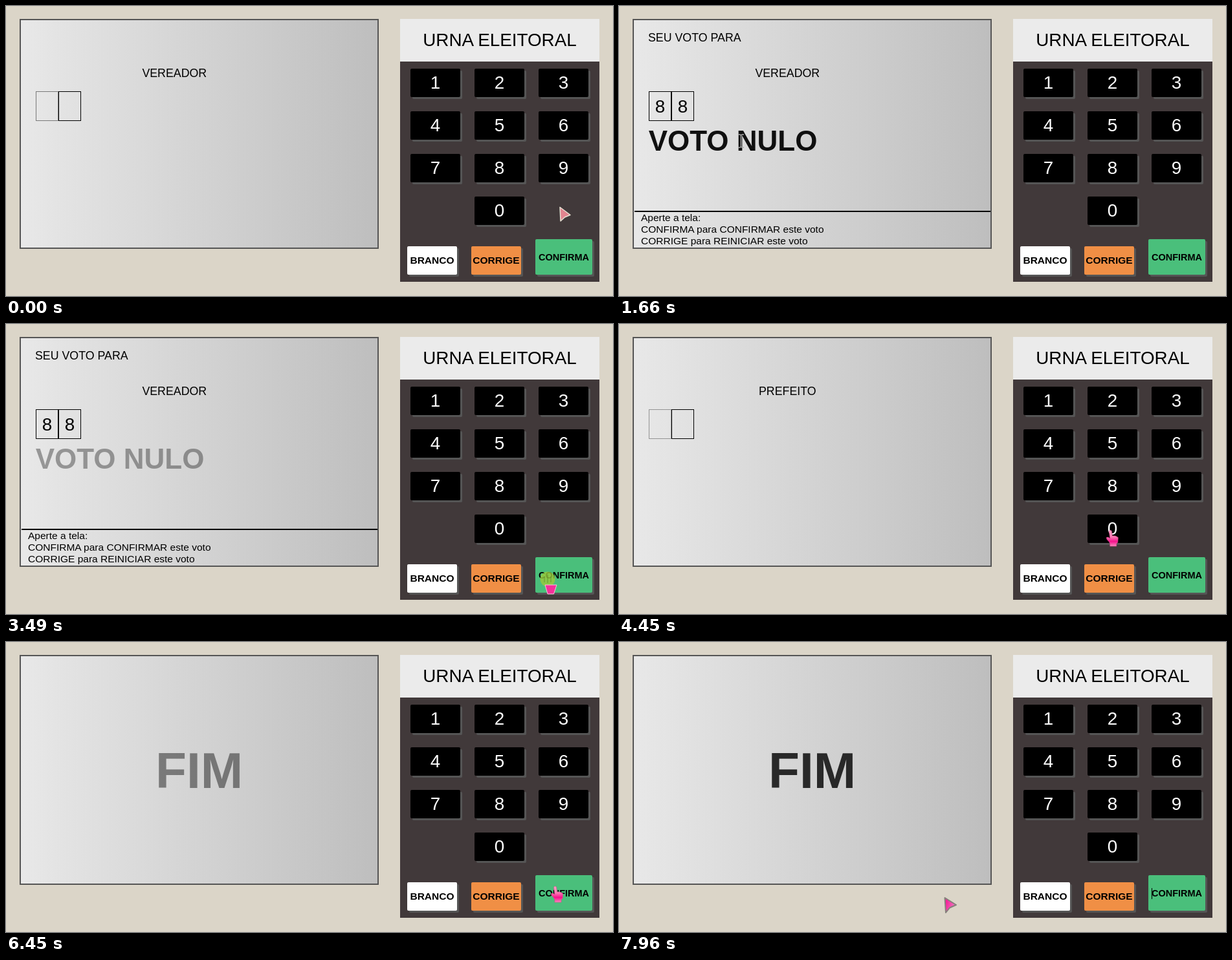
These frames come from a looping animation (938 px wide and 449 px high, 8000 ms). An HTML page:

```html
<!DOCTYPE html>
<html lang="pt-BR">
<head>
<meta charset="utf-8">
<title>Urna eleitoral</title>
<style>
html, body { margin: 0; width: 100%; height: 100%; overflow: hidden; background: #dbd5c8; }
svg { display: block; width: 938px; height: 449px; font-family: "Liberation Sans", Arial, sans-serif; }
.mid { text-anchor: middle; }
.bold { font-weight: bold; }
</style>
</head>
<body>
<svg viewBox="0 0 938 449">
  <defs>
    <linearGradient id="screenFill"><stop stop-color="#e8e8e8"/><stop offset="1" stop-color="#bebebe"/></linearGradient>
    <linearGradient id="handFill" x2="0" y2="1">
      <stop stop-color="#f9a5c8"/><stop offset=".4" stop-color="#fb7fb5"/><stop offset=".7" stop-color="#f5118c"/><stop offset="1" stop-color="#f98abf"/>
    </linearGradient>
    <linearGradient id="arrowFill" x2="1" y2=".4"><stop offset=".2" stop-color="#f5209a"/><stop offset="1" stop-color="#ee7cc0"/></linearGradient>
  </defs>

  <rect x="22" y="21" width="553" height="354" fill="url(#screenFill)" stroke="#555" stroke-width="2"/>
  <g id="ballot">
    <text id="office" class="mid" x="260.3" y="110" font-size="17.8"></text>
    <g id="slots"></g>
    <g id="summary">
      <text x="45" y="55" font-size="17.8">SEU VOTO PARA</text>
      <text id="nullVote" class="bold" x="45.7" y="224" font-size="44">VOTO NULO</text>
      <path d="M24 318H574" stroke="#000" stroke-width="2"/>
      <g font-size="15.5">
        <text x="34" y="333">Aperte a tela:</text>
        <text x="34" y="351">CONFIRMA para CONFIRMAR este voto</text>
        <text x="34" y="369">CORRIGE para REINICIAR este voto</text>
      </g>
    </g>
  </g>
  <text id="end" class="mid bold" x="298.7" y="226" font-size="78.5">FIM</text>

  <rect x="609" y="20" width="308" height="66" fill="#ebebeb"/>
  <text class="mid" x="763" y="62" font-size="27.8">URNA ELEITORAL</text>
  <rect x="609" y="86" width="308" height="341" fill="#41393a"/>
  <g id="keys"></g>
  <g id="selection">
    <rect x="755" y="301" width="15" height="32" fill="#0a63cf"/>
    <text class="mid" x="762.5" y="326" font-size="27.8" fill="#fff">0</text>
  </g>
  <path id="caret" d="M823.5 381V398" stroke="#000"/>

  <g id="cursor">
    <path id="arrow" d="M1.5 2L3 25L9 17.5L19 13Z" fill="url(#arrowFill)" stroke="#85807c" stroke-width="2" stroke-linejoin="round"/>
    <path id="paleArrow" d="M1 1.5L2 23L8.5 17L17 13.5Z" fill="#e2848f" stroke="#e6e0d2" stroke-width="1.5" stroke-linejoin="round"/>
    <path id="hand" d="M4.500 1.500Q6.500 -1 8.500 1.500L9.500 9Q15 8 18.500 11.500L18 19L16 21V25H6V21L4.500 18Q0 14 .5 11.500Q3 10 6 13Z" fill="url(#handFill)" stroke="#e0468f" stroke-width=".6"/>
    <path id="beam" d="M1 1H4L5.500 2L7 1H10M5.500 2V20M1 21H4L5.500 20L7 21H10" fill="none" stroke="#aaa" stroke-width="1.500"/>
    <g id="cactus">
      <circle cx="12" cy="12" r="11.500" fill="#9acb3c" opacity=".8"/>
      <path d="M7 8V17M12 5V18M17 8V17" stroke="#55822b" opacity=".7"/>
      <path d="M8 21H26L21.500 35H12Z" fill="#f4309a" stroke="#fbc3dd"/>
    </g>
  </g>
</svg>
<script>
const LOOP = 8000, STEP = 79.7, STEP_SHIFT = 18, BLINK = 714;
const $ = id => document.getElementById(id);

function button(label, x, y, w, h, fill, color, size, baseline, cls = "mid") {
  return `<rect x="${x + 3}" y="${y + 3}" width="${w}" height="${h}" rx="2" fill="#555"/>
    <rect x="${x}" y="${y}" width="${w}" height="${h}" rx="2" fill="${fill}"/>
    <text class="${cls}" x="${x + w / 2}" y="${baseline}" font-size="${size}" fill="${color}">${label}</text>`;
}

const digitKeys = [..."1234567890"].map((digit, i) => {
  const x = 625 + 99 * (i === 9 ? 1 : i % 3), y = 97 + 66 * Math.floor(i / 3);
  return button(digit, x, y, 77, 44, "#000", "#fff", 27.8, y + 31);
});
$("keys").innerHTML = digitKeys.join("") +
  button("BRANCO", 620, 372, 77, 44, "#fff", "#000", 15.5, 399, "mid bold") +
  button("CORRIGE", 719, 372, 77, 44, "#f08f45", "#000", 15.5, 399, "mid bold") +
  button("CONFIRMA", 818, 361, 88, 55, "#4abf7b", "#000", 14.5, 394, "mid bold");

$("slots").innerHTML = [46, 81].map(x => `<g>
  <rect x="${x + .5}" y="132.5" width="34" height="45" fill="none" stroke="#000"/>
  <text class="mid" x="${x + 17.5}" y="164.500" font-size="27.8"></text></g>`).join("");

const votes = [
  { office: "VEREADOR", digit: "8", start: -100, first: 300, second: 554, confirm: 3650 },
  { office: "PREFEITO", digit: "0", start: 3650, first: 4700, second: 4945, confirm: 6345 },
];

// Cursor path: time, x, y, shape used from then on
const path = [
  [0, 855, 310, "paleArrow"], [70, 845, 304, "paleArrow"], [220, 785, 262, "hand"], [300, 762, 254, "hand"],
  [640, 762, 254, "hand"], [760, 738, 295, "arrow"], [1000, 690, 370, "arrow"], [1330, 500, 340, "arrow"],
  [1570, 220, 215, "beam"], [1640, 183, 198, "beam"], [1800, 183, 198, "beam"], [1900, 225, 212, "arrow"],
  [2220, 588, 353, "arrow"], [2300, 606, 374, "hand"], [2370, 621, 390, "hand"], [2560, 655, 404, "hand"],
  [2780, 668, 405, "hand"], [3000, 668, 405, "hand"], [3320, 818, 383, "cactus"], [3480, 825, 383, "cactus"],
  [3640, 825, 383, "cactus"], [3780, 815, 380, "hand"], [4040, 815, 380, "hand"], [4400, 760, 320, "hand"],
  [4600, 728, 316, "hand"], [5360, 728, 316, "hand"], [5550, 813, 372, "hand"], [5800, 842, 378, "hand"],
  [6900, 842, 378, "hand"], [7160, 820, 376, "cactus"], [7400, 820, 376, "cactus"], [7470, 780, 380, "arrow"],
  [7800, 545, 391, "arrow"], [7950, 502, 394, "arrow"], [LOOP, 502, 394, "arrow"],
];
const shapes = ["arrow", "paleArrow", "hand", "beam", "cactus"];

// CSS "ease", solved by bisection
function ease(x) {
  const bezier = (s, a, b) => 3 * (1 - s) ** 2 * s * a + 3 * (1 - s) * s * s * b + s ** 3;
  let lo = 0, hi = 1;
  for (let i = 0; i < 20; i++) {
    const s = (lo + hi) / 2;
    if (bezier(s, .25, .25) < x) lo = s; else hi = s;
  }
  return bezier(lo, .1, 1);
}

function blink(elapsed) {
  const phase = 2 * (elapsed % BLINK) / BLINK;
  return phase < 1 ? ease(phase) : 1 - ease(phase - 1);
}

function show(id, visible) {
  $(id).style.display = visible ? "" : "none";
}

function drawScreen(t) {
  const vote = votes.find(v => t < v.confirm);
  show("ballot", vote);
  show("end", !vote);
  if (!vote) {
    $("end").setAttribute("opacity", blink(t - votes[1].confirm));
    return;
  }
  const { start, first, second } = vote;
  $("office").textContent = vote.office;
  [[start, first], [first, second]].forEach(([from, typed], i) => {
    const slot = $("slots").children[i];
    slot.setAttribute("opacity", t >= from && t < typed ? blink(t - from) : 1);
    slot.lastElementChild.textContent = t >= typed ? vote.digit : "";
  });
  show("summary", t >= second);
  if (t >= second) $("nullVote").setAttribute("opacity", blink(t - second));
}

function drawCursor(t) {
  const next = path.findIndex(p => p[0] > t);
  const [t0, x0, y0, shape] = path[next - 1], [t1, x1, y1] = path[next];
  const k = (t - t0) / (t1 - t0);
  $("cursor").setAttribute("transform", `translate(${x0 + (x1 - x0) * k} ${y0 + (y1 - y0) * k})`);
  shapes.forEach(id => show(id, id === shape));
}

function draw(now) {
  const step = Math.floor((now % LOOP + STEP_SHIFT) / STEP);
  const t = Math.max(0, step * STEP - STEP_SHIFT);
  drawScreen(t);
  drawCursor(t);
  show("selection", t >= votes[1].second && t < votes[1].confirm);
  show("caret", t >= 7420);
  requestAnimationFrame(draw);
}
draw(performance.now());
</script>
</body>
</html>
```
